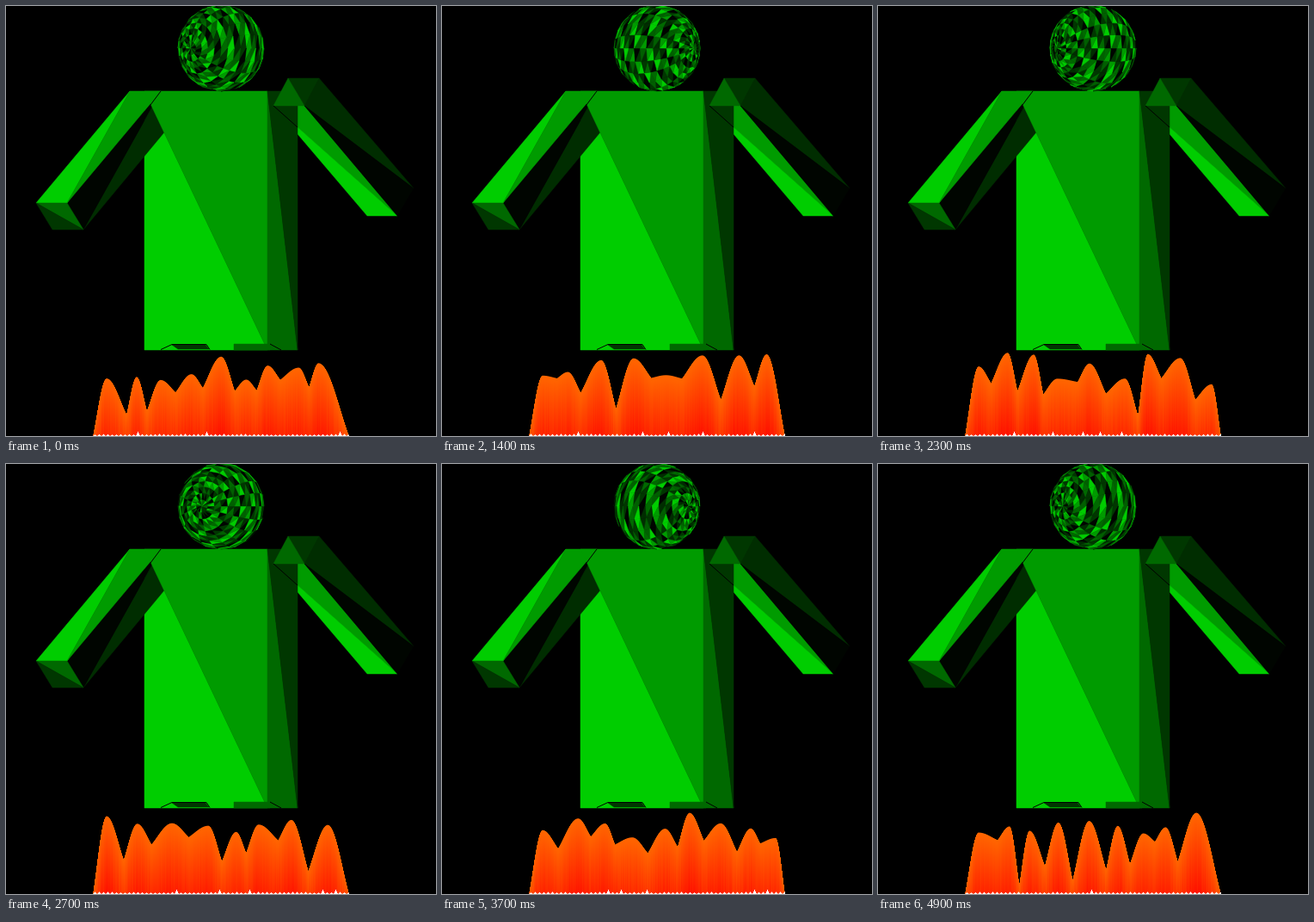
Recreate the animation shown at these times as an HTML page with a canvas. Size 500x500 px, loop 5000 ms.

```html
<!DOCTYPE html>
<html lang="en">
<head>
<meta charset="utf-8">
<title>Jet robot</title>
<style>
  html, body { margin: 0; width: 100%; height: 100%; overflow: hidden; background: #000; }
  canvas { display: block; width: 500px; height: 500px; }
</style>
</head>
<body>
<canvas id="stage" width="500" height="500"></canvas>
<script>
const ctx = document.getElementById('stage').getContext('2d');
const STEPS = 50, STEP_MS = 100, SEG = 20;

// Facing triangles take the next of seven shades, starting afresh on each solid
const shade = k => `rgb(0,${Math.abs(205 - 50 * (k % 7))},0)`;

function poly(k, ...pts) {
  ctx.fillStyle = ctx.strokeStyle = shade(k);
  ctx.lineWidth = 0.5;
  ctx.beginPath();
  for (let i = 0; i < pts.length; i += 2) ctx.lineTo(pts[i], pts[i + 1]);
  ctx.closePath();
  ctx.fill();
  ctx.stroke();
}

function line(...pts) {
  ctx.strokeStyle = '#000';
  ctx.lineWidth = 1;
  ctx.beginPath();
  for (let i = 0; i < pts.length; i += 2) ctx.lineTo(pts[i], pts[i + 1]);
  ctx.stroke();
}

// Small seeded generator of numbers from 0 to 1
function rng(seed) {
  let s = seed * 7919 + 17;
  return () => {
    s = (s + 0x6D2B79F5) | 0;
    let t = Math.imul(s ^ (s >>> 15), 1 | s);
    t = (t + Math.imul(t ^ (t >>> 7), 61 | t)) ^ t;
    return ((t ^ (t >>> 14)) >>> 0) / 4294967296;
  };
}

function drawBody() {
  // Right arm, behind the torso
  poly(1, 311, 116, 347, 116, 455, 244);
  poly(0, 311, 116, 455, 244, 420, 244);
  poly(5, 347, 116, 364, 84, 474, 212);
  poly(4, 347, 116, 474, 212, 455, 244);

  // The left arm cuts between the two front triangles
  poly(0, 161, 99, 304, 400, 161, 400);
  poly(5, 180, 99, 198, 130, 90, 260);
  poly(4, 180, 99, 90, 260, 71, 229);
  poly(0, 144, 99, 71, 229, 35, 229);
  poly(1, 144, 99, 180, 99, 71, 229);
  poly(2, 35, 229, 71, 229, 90, 260);
  poly(3, 35, 229, 90, 260, 54, 260);
  poly(1, 161, 99, 304, 99, 304, 400);
  line(168, 115, 180, 99);
  poly(2, 304, 99, 339, 400, 304, 400);
  poly(3, 304, 99, 339, 99, 339, 400);

  // Right shoulder
  poly(3, 328, 84, 364, 84, 347, 116);
  poly(2, 328, 84, 347, 116, 311, 116);
  line(311, 116, 339, 141);

  // Hips
  poly(3, 193, 394, 232, 394, 236, 399, 200, 399);
  line(180, 399.5, 193, 393.5, 233, 393.5, 237, 399.5);
  poly(2, 265, 393, 307, 393, 307, 400, 265, 400);
  line(307, 393, 320, 400);
}

function drawHead(step) {
  const a = Math.PI / 4 + 2 * Math.PI * step / (STEPS - 1);
  const cos = Math.cos(a), sin = Math.sin(a);
  const point = (turn, lat) => {
    const p = Math.PI * lat / SEG, q = 2 * Math.PI * turn / SEG;
    const x = Math.cos(p), y = Math.sin(p) * Math.cos(q), z = Math.sin(p) * Math.sin(q);
    return [250 + 50 * (x * cos + z * sin), 49 - 50 * y];
  };
  let count = 0;
  const facet = (p, q, r) => {
    const area = (q[0] - p[0]) * (r[1] - p[1]) - (q[1] - p[1]) * (r[0] - p[0]);
    if (area < -1e-6) poly(count++, ...p, ...q, ...r);
  };
  for (let i = 0; i < SEG; i++) {
    for (let j = 0; j < SEG; j++) {
      const p = point(i, j), r = point(i + 1, j + 1);
      if (j < SEG - 1) facet(p, point(i, j + 1), r);
      if (j > 0) facet(p, r, point(i + 1, j));
    }
  }
}

// Alternating peaks and valleys as [x, height]
function flameOutline(rand) {
  const pts = [[101, 0]];
  let peak = true;
  for (let x = 117; x < 380; x += 11 + 13 * rand()) {
    pts.push([x, peak ? 65 + 33 * rand() : 68 * rand() ** 0.4]);
    peak = !peak;
  }
  if (peak) pts.push([388, 45 + 25 * rand()]);
  return [...pts, [399, 0]];
}

// Round at the peak, sharp in the valley
const slope = u => (Math.cos(2.2 * u) - Math.cos(2.2)) / (1 - Math.cos(2.2));

function drawFire(step) {
  const rand = rng(step + 1);
  const pts = flameOutline(rand);
  let k = 0, tooth;
  for (let x = 101; x < 399; x++) {
    while (x + 0.5 > pts[k + 1][0]) k++;
    const [x0, h0] = pts[k], [x1, h1] = pts[k + 1];
    const u = (x + 0.5 - x0) / (x1 - x0);
    const lo = Math.min(h0, h1);
    const h = lo + Math.abs(h1 - h0) * slope(h1 > h0 ? 1 - u : u);

    const fill = ctx.createLinearGradient(0, 500 - h, 0, 500);
    fill.addColorStop(0, 'rgb(255,102,0)');
    fill.addColorStop(1, `rgb(255,${Math.max(15, 92 - 0.7 * h - 14 * rand())},0)`);
    ctx.fillStyle = fill;
    ctx.fillRect(x, 500 - h, 1, h);

    // White teeth along the base
    const phase = (x - 101) % 5;
    if (!phase) tooth = rand() < 0.06 ? 5 : 1.5 + rand();
    const white = Math.min(h, tooth * (1 - Math.abs(phase - 2) / 2.5));
    ctx.fillStyle = '#fff';
    ctx.fillRect(x, 500 - white, 1, white);
  }
}

const start = performance.now();
let shown = -1;

function tick() {
  const step = Math.floor((performance.now() - start) / STEP_MS) % STEPS;
  if (step !== shown) {
    shown = step;
    ctx.fillStyle = '#000';
    ctx.fillRect(0, 0, 500, 500);
    drawBody();
    drawHead(step);
    drawFire(step);
  }
  requestAnimationFrame(tick);
}
tick();
</script>
</body>
</html>
```
